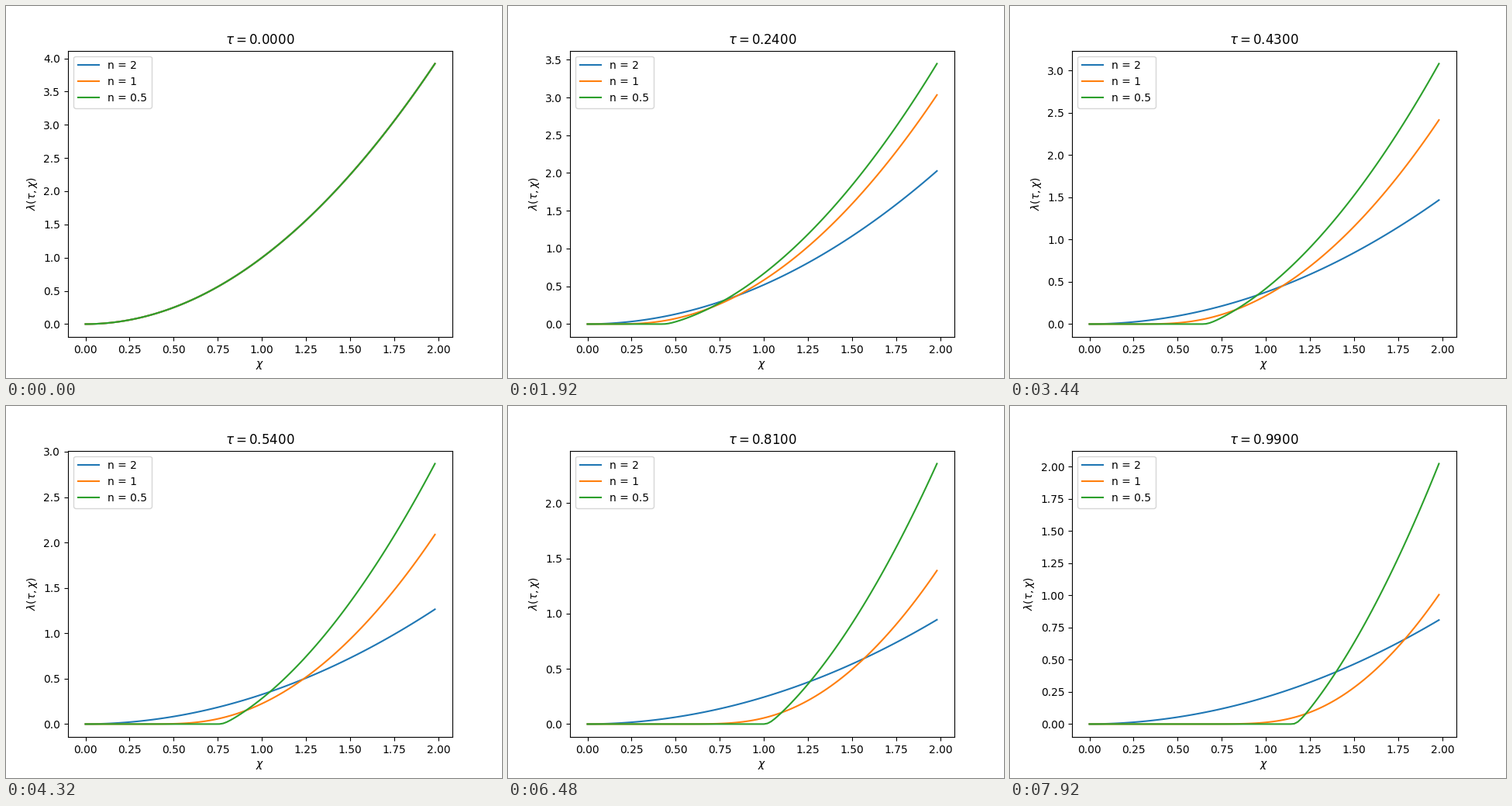
Animation of 640x480 px, one loop 8000 ms. Source, as a matplotlib script:

```python
import numpy as np
import matplotlib.pyplot as plt
from matplotlib.animation import FuncAnimation

FRAMES = 100
INTERVAL = 80          # ms
DX = 0.02
DTAU = 0.005
STEPS_PER_FRAME = 2
POWERS = (2, 1, 0.5)

chi = np.arange(100) * DX


def slope_power(drop, n):
    """Value of p**n where DX * p + DTAU * p**n = drop."""
    if drop <= 0:
        return 0.0
    if n == 1:
        return drop / (DX + DTAU)
    if n == 2:
        p = 2 * drop / (DX + np.sqrt(DX * DX + 4 * DTAU * drop))
        return p * p
    return 2 * drop / (DTAU + np.sqrt(DTAU * DTAU + 4 * DX * drop))


def advance(lam, n):
    """One implicit upwind step of d(lam)/d(tau) = -(d(lam)/d(chi))**n."""
    new = lam.copy()
    for i in range(1, len(lam)):
        new[i] = lam[i] - DTAU * slope_power(lam[i] - new[i - 1], n)
    return new


def solve(n):
    lam = chi ** 2
    history = [lam]
    for _ in range(FRAMES - 1):
        for _ in range(STEPS_PER_FRAME):
            lam = advance(lam, n)
        history.append(lam)
    return history


solutions = [solve(n) for n in POWERS]

fig, ax = plt.subplots(figsize=(6.4, 4.8), dpi=100)
lines = [ax.plot(chi, sol[0], label=f"n = {n}")[0]
         for n, sol in zip(POWERS, solutions)]
ax.set_xlabel(r"$\chi$")
ax.set_ylabel(r"$\lambda(\tau, \chi)$")
title = ax.set_title("")
ax.legend(loc="upper left")


def update(frame):
    for line, sol in zip(lines, solutions):
        line.set_data(chi, sol[frame])
    ax.relim()
    ax.autoscale_view()
    title.set_text(rf"$\tau = {frame / FRAMES:.4f}$")
    return [*lines, title]


anim = FuncAnimation(fig, update, frames=FRAMES, interval=INTERVAL,
                     repeat=True, repeat_delay=0, blit=False)
plt.show()
```
